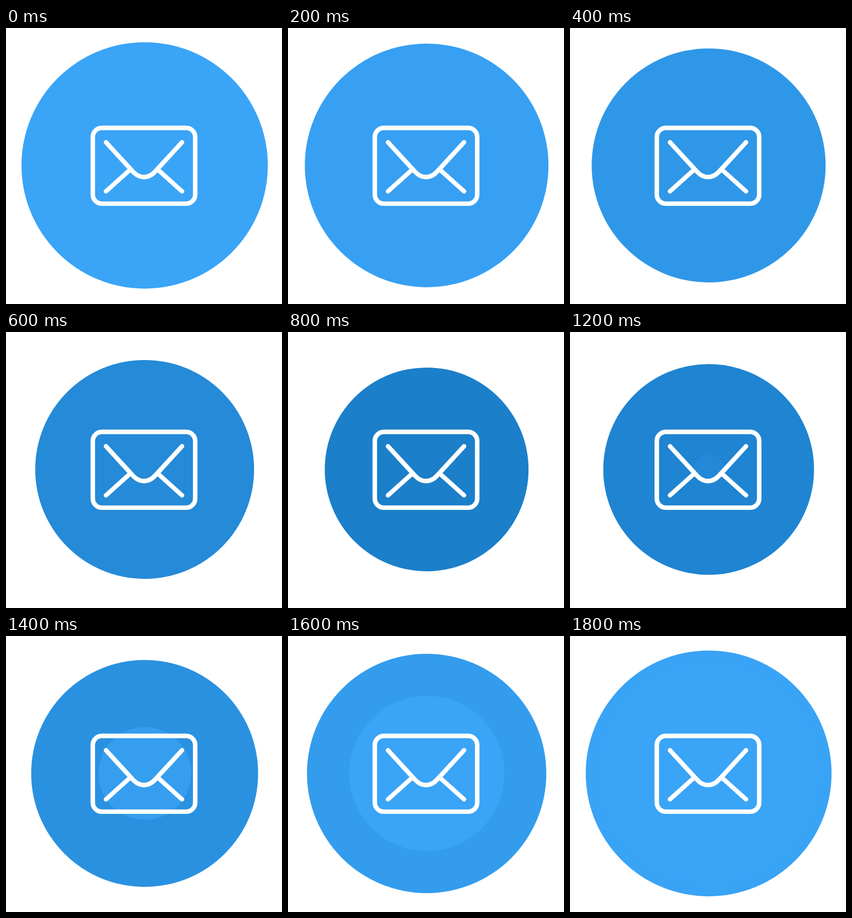
These frames come from a looping animation (512x512 px, 1900 ms). An HTML page:

```html
<!DOCTYPE html>
<html lang="en">
<head>
<meta charset="utf-8">
<title>Pulsing mail icon</title>
<style>
  html, body { margin: 0; width: 100%; height: 100%; overflow: hidden; background: #fff; }
  svg { display: block; width: 100%; height: 100%; }
</style>
</head>
<body>
<svg viewBox="0 0 512 512">
  <circle id="disc" cx="257.2" cy="254.9"/>
  <circle id="ripple" cx="257.5" cy="255" fill="#3aa4f7"/>
  <g fill="none" stroke="#fff" stroke-width="8.4" stroke-linecap="round">
    <rect x="161" y="185.3" width="190" height="140.6" rx="17"/>
    <path d="M185.5 212 L236 267 Q245 276.5 256 276.5 Q267 276.5 276 267 L326.5 212"/>
    <path d="M185.5 303 L230 263 M326.5 303 L282 263"/>
  </g>
</svg>
<script>
  const STEP = 100, STEPS = 19;
  const FULL = 228.5, DEPTH = 44;
  const LIGHT = [58, 164, 247], DARK = [24, 123, 198];
  // Eased shrink; the second half of the loop mirrors the first.
  const SHRINK = [0, 0.5, 2.5, 6.5, 11.5, 18, 25.5, 33, 39.5, 43.5];

  const disc = document.getElementById('disc');
  const ripple = document.getElementById('ripple');

  const clamp = v => Math.max(0, Math.min(1, v));
  const mix = (a, b, k) => `rgb(${a.map((v, i) => Math.round(v + (b[i] - v) * k))})`;

  function draw(ms) {
    const step = Math.floor(ms / STEP) % STEPS;
    const drop = SHRINK[Math.min(step, STEPS - step)];
    disc.setAttribute('r', FULL - drop);
    disc.setAttribute('fill', mix(LIGHT, DARK, Math.pow(drop / DEPTH, 0.85)));

    // A lighter disc spreads from the centre while the circle grows back.
    const since = step - 12;
    ripple.setAttribute('r', since < 0 ? 0 : 28 + 29 * since);
    ripple.setAttribute('opacity', clamp(0.15 + 0.27 * since));
  }

  const start = performance.now();
  function tick() {
    draw(performance.now() - start);
    requestAnimationFrame(tick);
  }
  tick();
</script>
</body>
</html>
```
